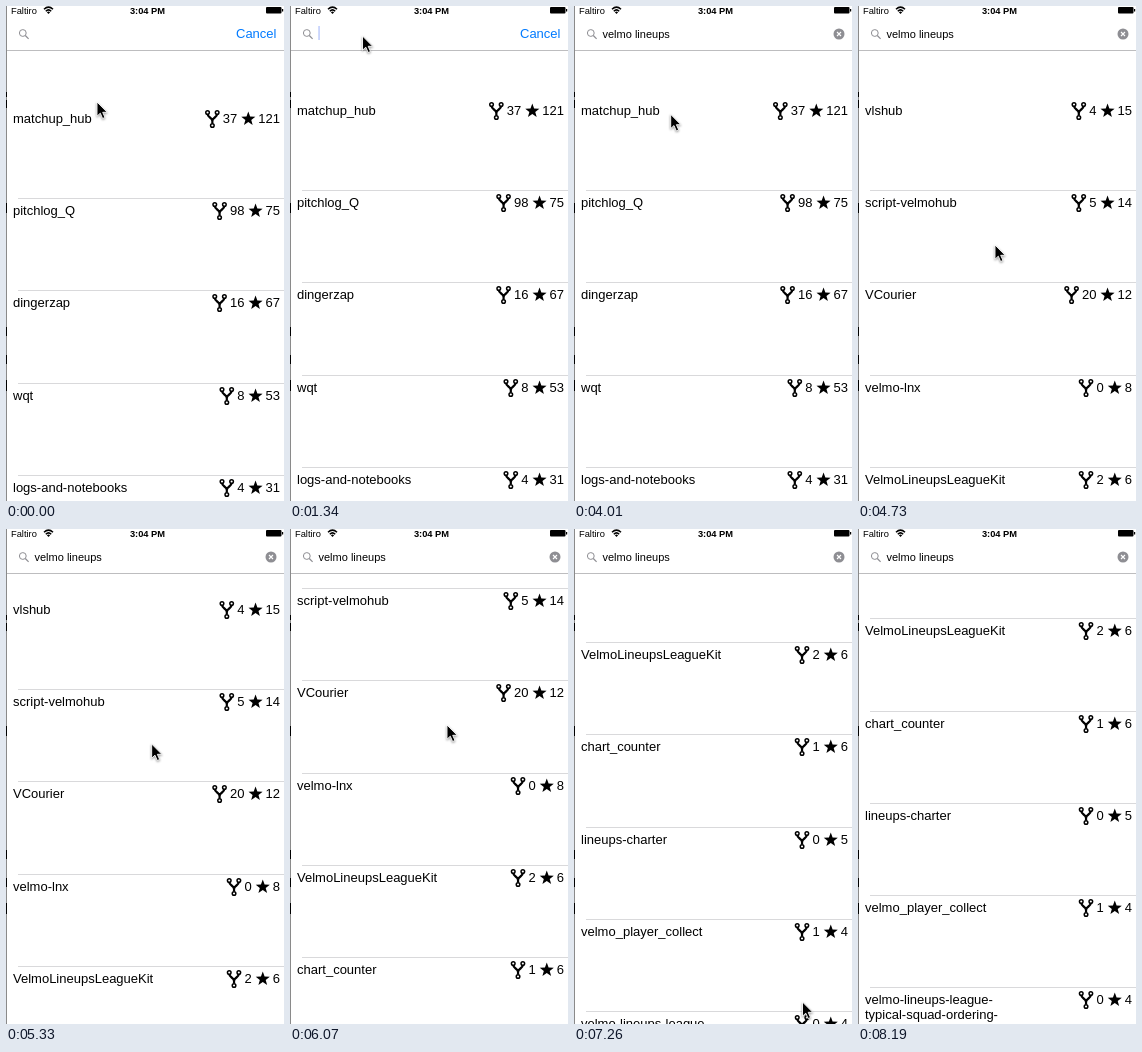
Recreate the animation shown at these times as an HTML page. Size 278 by 495 pixels, loop 8290 ms.

```html
<!DOCTYPE html>
<html lang="en">
<head>
<meta charset="utf-8">
<title>Repository search</title>
<style>
  html, body { margin: 0; width: 100%; height: 100%; overflow: hidden; background: #fff; }
  svg { display: block; width: 278px; height: 495px; }
  text { font: 13px "Liberation Sans", Arial, sans-serif; white-space: pre; }
  .status { font-size: 9.3px; }
  #query { font-size: 11px; }
  #pointer { filter: drop-shadow(0 1px 1px #0006); }
</style>
</head>
<body>
<svg viewBox="0 0 278 495">
  <defs>
    <g id="fork" fill="none" stroke="#000">
      <path stroke-width="2.2" d="M-4.8-4.5C-4.8-1-0-1 0 2.5V5M4.8-4.5C4.8-1 0-1 0 2.5"/>
      <g stroke-width="1.5" fill="#fff">
        <circle cx="-4.8" cy="-6" r="1.8"/><circle cx="4.8" cy="-6" r="1.8"/><circle cy="7" r="1.8"/>
      </g>
    </g>
    <polygon id="star"/>
  </defs>

  <g id="list"></g>

  <rect width="278" height="44" fill="#fff"/>
  <rect y="44" width="278" height="1" fill="#bdbdbf"/>

  <text class="status" x="5" y="7.5">Faltiro</text>
  <g fill="none" stroke="#000" stroke-width="1.5">
    <path d="M38 3.2Q42.5-1 47 3.2M39.8 5.2Q42.5 2.6 45.2 5.2"/>
  </g>
  <path d="M40.9 6.2Q42.5 5 44.1 6.2L42.5 8z"/>
  <text class="status" x="141.5" y="7.5" text-anchor="middle" font-weight="700" style="font-weight:700">3:04 PM</text>
  <rect x="260" y="1" width="15.5" height="6.5" rx="1"/>
  <rect x="276" y="3" width="1.2" height="2.5"/>

  <g fill="none" stroke="#8e8e93">
    <circle cx="16.8" cy="27" r="3.4"/><path d="M19.3 29.5L22.6 32.8" stroke-width="1.2"/>
  </g>
  <text id="query" x="28.5" y="31.5"></text>
  <rect id="caret" y="20" width="1.5" height="14" fill="#426bf2"/>
  <g id="clear">
    <circle r="5.5" fill="#8e8e93"/>
    <path d="M-2-2L2 2M2-2L-2 2" stroke="#fff" stroke-width="1.1"/>
  </g>
  <text id="cancel" x="230" y="32.4" fill="#007aff">Cancel</text>

  <rect width="1" height="495" fill="#8a8a8a"/>
  <path d="M.5 86V91M.5 94V102M.5 197V207M.5 321V330M.5 349V358M.5 374V385" stroke="#000"/>

  <path id="pointer" d="M0 0V14.2L3.3 11.2 5.6 16.5 8 15.5 5.7 10.3H10.2Z" fill="#000" stroke="#fff" stroke-width=".9"/>
</svg>
<script>
const $ = id => document.getElementById(id);
const LOOP = 8290, TICK = 148, PITCH = 92.25, DIGIT = 7.23;
const QUERY = 'velmo lineups';

// name, forks, stars
const before = [
  ['matchup_hub', 37, 121], ['pitchlog_Q', 98, 75], ['dingerzap', 16, 67],
  ['wqt', 8, 53], ['logs-and-notebooks', 4, 31]
];
const results = [
  ['vlshub', 4, 15], ['script-velmohub', 5, 14], ['VCourier', 20, 12],
  ['velmo-lnx', 0, 8], ['VelmoLineupsLeagueKit', 2, 6], ['chart_counter', 1, 6],
  ['lineups-charter', 0, 5], ['velmo_player_collect', 1, 4],
  ['velmo-lineups-league-\ntypical-squad-ordering-', 0, 4]
];

// Keys are [tick, ...values]
const scrollKeys = [[0, -8], [4, 0], [34, 0], [37, 36], [38, 36], [40, 47.7]];
const pointerKeys = [
  [0, 91, 96], [4, 72.5, 30], [24, 72.5, 30], [32, 137, 239], [34, 137, 239],
  [37, 150, 203], [41, 157, 196], [45, 164, 215], [49, 228.5, 473], [51, 245, 530]
];

$('star').setAttribute('points', Array.from({ length: 10 }, (_, i) => {
  const r = i % 2 ? 3.1 : 7.4, a = i * Math.PI / 5;
  return [r * Math.sin(a), -r * Math.cos(a)].map(v => v.toFixed(2));
}).join(' '));

function tween(keys, n) {
  const i = keys.findIndex(k => k[0] > n);
  if (i < 0) return keys.at(-1).slice(1);
  const [a, b] = [keys[i - 1], keys[i]], p = (n - a[0]) / (b[0] - a[0]);
  return a.slice(1).map((v, j) => v + (b[j + 1] - v) * p);
}

// The flick slows down exponentially
const scroll = n => n < 40 ? tween(scrollKeys, n)[0] : 377.5 - 252.5 * Math.exp((41 - n) * 0.267);

function typed(n) {
  if (n < 12) return 0;
  if (n < 15) return n < 13 ? 1 : 3;
  return Math.min(QUERY.length, 4 + Math.floor((n - 15) * 1.5));
}

function row([name, forks, stars], i, offset) {
  const top = Math.round(91.75 + i * PITCH - offset), base = top + 16.6;
  const starX = 274 - DIGIT * String(stars).length - 10;
  const forkX = starX - 11 - DIGIT * String(forks).length - 10.5;
  const lines = name.split('\n').map((s, j) => `<text x="7" y="${base + j * 15}">${s}</text>`);
  return (i ? `<rect x="12" y="${top}" width="266" height="1" fill="#d9d9db"/>` : '') + lines.join('') +
    `<use href="#fork" x="${forkX}" y="${top + 12.5}"/>
     <text x="${starX - 11}" y="${base}" text-anchor="end">${forks}</text>
     <use href="#star" x="${starX}" y="${top + 13}"/>
     <text x="274" y="${base}" text-anchor="end">${stars}</text>`;
}

function draw(n) {
  const offset = scroll(n), count = typed(n);
  $('list').innerHTML = (n < 28 ? before : results).map((r, i) => row(r, i, offset)).join('');

  $('query').textContent = QUERY.slice(0, count);
  $('caret').setAttribute('x', count ? 28.5 + $('query').getComputedTextLength() : 28.3);
  $('caret').setAttribute('opacity', n === 9 ? 0.35 : +((n >= 4 && n < 9) || (n >= 12 && n < 25)));

  const leave = Math.min(1, Math.max(0, (n - 24) / 3));
  $('clear').setAttribute('transform', `translate(${210.5 + 54.5 * leave} 28)`);
  $('clear').setAttribute('opacity', +(count > 0));
  $('cancel').setAttribute('opacity', 1 - leave);
  $('pointer').setAttribute('transform', `translate(${tween(pointerKeys, n)})`);
}

const start = performance.now();
let last = -1;
function frame() {
  const t = (performance.now() - start) % LOOP;
  const n = t >= 8190 ? 55 : Math.min(54, Math.floor((t + 6) / TICK));
  if (n !== last) draw(last = n);
  requestAnimationFrame(frame);
}
frame();
</script>
</body>
</html>
```
